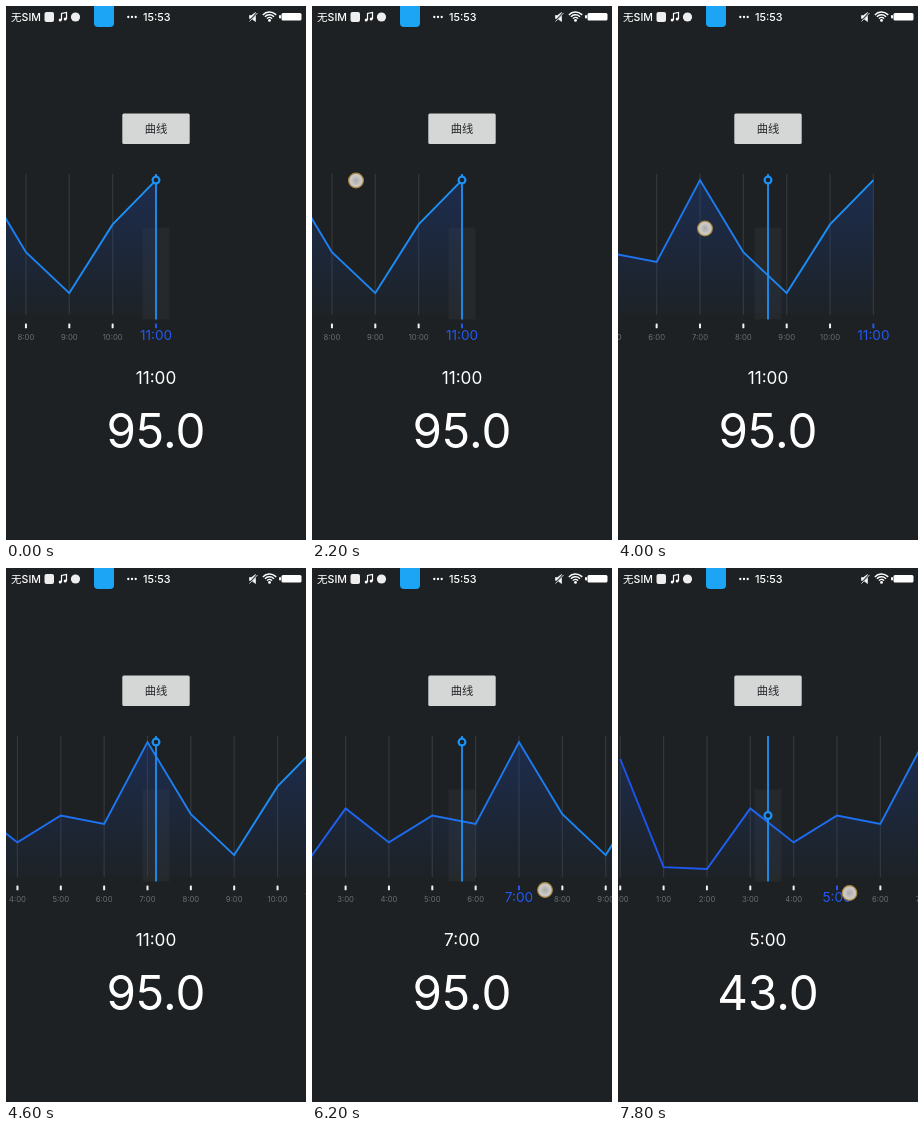
These frames come from a looping animation (300 by 534 pixels, 8 s). An HTML page with a canvas:

```html
<!DOCTYPE html>
<html lang="zh">
<head>
<meta charset="utf-8">
<style>
html, body { margin: 0; width: 100%; height: 100%; overflow: hidden; background: #1d2123; }
canvas { display: block; width: 300px; height: 534px; }
</style>
</head>
<body>
<canvas id="stage"></canvas>
<script>
const LOOP = 8000, STEP = 200, GAP = 43.35, MID = 150;
const BG = '#1d2123', ACCENT = '#1c92f6', SELECTED = '#2459ee';
const FONT = 'Inter, "Noto Sans CJK SC", "Noto Sans CJK", sans-serif';

// One reading per hour, 0:00 to 11:00
const values = [83, 6.5, 5.2, 48, 24, 43, 37, 95, 44, 15, 63.6, 95];

// The finger pulls the chart for `drag` ms, then it settles on `hour`
const swipes = [
  { start: 2200, drag: 200, from: [44, 174.5], to: [66.5, 189.5], pull: 0, settle: 1, hour: 11 },
  { start: 3600, drag: 400, from: [29, 212], to: [87, 222.5], pull: 105.4, settle: 800, hour: 7 },
  { start: 5800, drag: 400, from: [209.5, 319.5], to: [233, 322], pull: 57, settle: 600, hour: 5 },
  { start: 7450, drag: 350, from: [209, 321], to: [231.5, 325], pull: 69, settle: 600, hour: 3 }
];

const canvas = document.getElementById('stage');
const ctx = canvas.getContext('2d');
const dpr = window.devicePixelRatio || 1;
canvas.width = 300 * dpr;
canvas.height = 534 * dpr;

const yOf = v => 308.3 - 1.413 * v;
const lerp = (a, b, p) => a + (b - a) * p;

function stateAt(t) {
  let sel = 11, offset = 0, touch = null;
  for (const s of swipes) {
    if (t < s.start) break;
    const p = Math.min(1, (t - s.start) / s.drag) ** 5;
    const u = Math.min(1, Math.max(0, t - s.start - s.drag) / s.settle);
    const rest = (11 - s.hour) * GAP;
    offset = lerp(rest, offset + s.pull * p, (1 - u) ** 1.5);
    if (u === 1) sel = s.hour;
    touch = u > 0 ? null : s.from.map((a, i) => lerp(a, s.to[i], p));
  }
  return { sel, offset, touch };
}

function rect(x, y, w, h, fill, r = 0) {
  ctx.fillStyle = fill;
  ctx.beginPath();
  ctx.roundRect(x, y, w, h, r);
  ctx.fill();
}

function circle(x, y, r, fill, stroke, width = 1) {
  ctx.beginPath();
  ctx.arc(x, y, r, 0, 7);
  if (fill) { ctx.fillStyle = fill; ctx.fill(); }
  if (stroke) { ctx.strokeStyle = stroke; ctx.lineWidth = width; ctx.stroke(); }
}

function text(s, x, y, size, fill, align = 'center', weight = 400) {
  ctx.font = `${weight} ${size}px ${FONT}`;
  ctx.textAlign = align;
  ctx.fillStyle = fill;
  ctx.fillText(s, x, y);
}

function path(d, stroke, width, fill) {
  const p = new Path2D(d);
  if (fill) { ctx.fillStyle = fill; ctx.fill(p); }
  ctx.strokeStyle = stroke;
  ctx.lineWidth = width;
  ctx.stroke(p);
}

function vertical(y0, y1, from, to) {
  const g = ctx.createLinearGradient(0, y0, 0, y1);
  g.addColorStop(0, from);
  g.addColorStop(1, to);
  return g;
}

function statusBar() {
  text('无SIM', 5, 15, 10.6, '#fff', 'left', 500);
  rect(38.5, 6, 9.5, 10, '#eee', 2);
  path('M55.5 14V7.5L60.5 6.5V13', '#fff', 1.2);
  circle(54.2, 14, 1.5, '#fff');
  circle(59.2, 13, 1.5, '#fff');
  circle(69.5, 11, 4.6, '#eee');
  rect(88, 0, 20, 21, '#1ca5f5', [0, 0, 4, 4]);
  for (const x of [122.3, 126, 129.7]) circle(x, 11, 1.15, '#fff');
  text('15:53', 137, 15, 10.8, '#fff', 'left', 500);

  path('M243.5 9.5H245.5L249.5 6.5V15.5L245.5 12.5H243.5Z', '#fff', .6, '#fff');
  path('M243 15.5L251.5 6.5', BG, 1.8);
  path('M243.5 15.5L251.5 7', '#fff', .8);
  for (const r of [3.5, 6.2, 9]) {
    ctx.beginPath();
    ctx.arc(263.5, 15, r, -2.4, -.74);
    ctx.strokeStyle = '#fff';
    ctx.lineWidth = 1.4;
    ctx.stroke();
  }
  circle(263.5, 14.4, 1.4, '#fff');
  rect(273, 9, 2, 3.6, '#fff', 1);
  rect(275.5, 7, 20, 7.5, '#fff', 1.5);
}

function chart(offset, sel) {
  const xOf = h => MID + offset - (11 - h) * GAP;
  const first = xOf(0), last = xOf(11);

  rect(136.5, 221.5, 27, 92, 'rgba(255,255,255,.035)');
  values.forEach((v, h) => rect(xOf(h) - .6, 168, 1.2, 141, '#34383a'));

  const line = new Path2D();
  values.forEach((v, h) => line.lineTo(xOf(h), yOf(v)));
  const area = new Path2D(line);
  area.lineTo(last, 308.5);
  area.lineTo(first, 308.5);
  ctx.fillStyle = vertical(174, 309, 'rgba(28,64,150,.38)', 'rgba(28,64,150,.03)');
  ctx.fill(area);

  const hue = ctx.createLinearGradient(first, 0, last, 0);
  hue.addColorStop(0, '#1d50ee');
  hue.addColorStop(1, '#1c94f6');
  ctx.strokeStyle = hue;
  ctx.lineWidth = 1.9;
  ctx.stroke(line);

  values.forEach((v, h) => {
    const x = xOf(h), on = h === sel;
    rect(x - 1, 317.5, 2, 4.8, on ? SELECTED : '#f2f2f2', .6);
    text(h + ':00', x, on ? 334 : 333.8, on ? 13.6 : 7.7, on ? SELECTED : '#6b6f71');
  });

  rect(MID - .9, 168, 1.8, 145.5, ACCENT);
  circle(MID, yOf(values[sel]), 3.4, BG, ACCENT, 2.2);
}

function finger(x, y) {
  const g = ctx.createRadialGradient(x, y, 0, x, y, 7.4);
  g.addColorStop(0, '#a9a9a9');
  g.addColorStop(.7, '#cbcac8');
  g.addColorStop(1, '#c8c0ae');
  circle(x, y, 7.4, g, '#a5823f', 1.1);
}

function draw(t) {
  const { sel, offset, touch } = stateAt(t);
  ctx.setTransform(dpr, 0, 0, dpr, 0, 0);
  rect(0, 0, 300, 534, BG);
  statusBar();

  rect(116.3, 107.5, 67.4, 30.6, '#d5d7d7', 1.5);
  text('曲线', MID, 127.3, 11.3, '#26292b');

  chart(offset, sel);
  text(sel + ':00', MID, 378, 17.2, '#fff');
  text(values[sel].toFixed(1), MID, 441.5, 47.5, '#fff');
  if (touch) finger(...touch);
}

function frame(now) {
  draw(Math.floor(now % LOOP / STEP) * STEP);
  requestAnimationFrame(frame);
}
requestAnimationFrame(frame);
</script>
</body>
</html>
```
